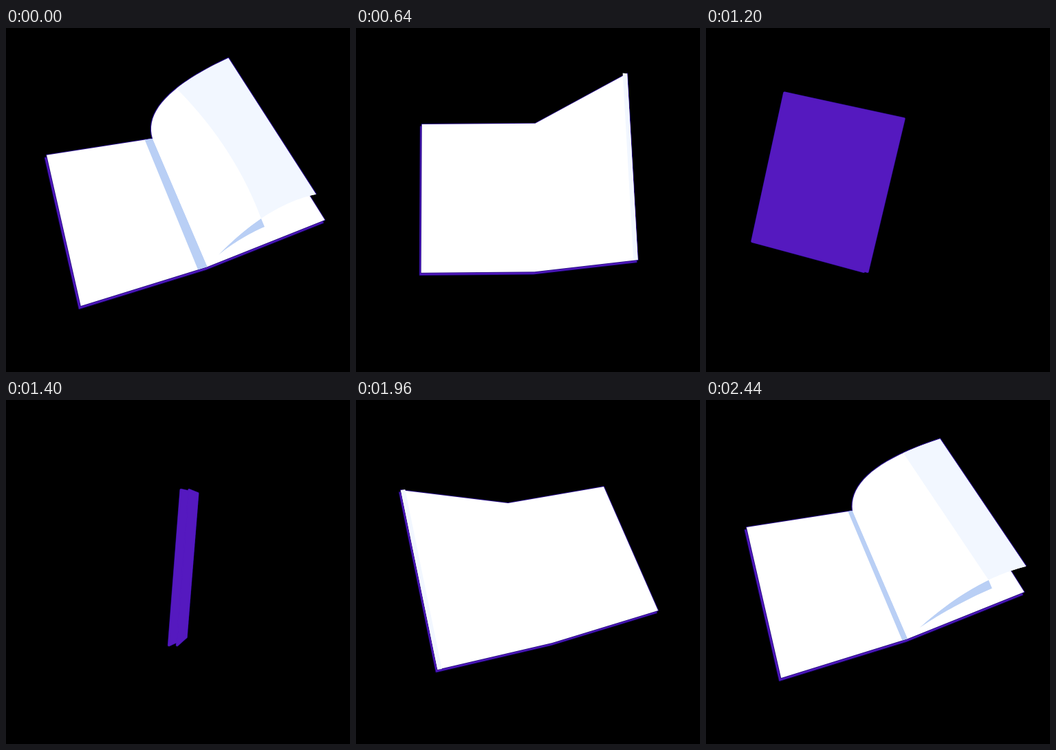
An HTML page with a canvas for the animation above (2480 ms loop, 500 by 500 pixels).

```html
<!DOCTYPE html>
<html lang="en">
<head>
<meta charset="utf-8">
<title>Turning book</title>
<style>
html, body { margin: 0; width: 100%; height: 100%; overflow: hidden; background: #000; }
canvas { display: block; width: 500px; height: 500px; }
</style>
</head>
<body>
<canvas id="stage" width="500" height="500"></canvas>
<script>
const ctx = document.getElementById('stage').getContext('2d');
const { PI, sin, cos, abs, min, max } = Math;
const LOOP = 2480, STEP = 40;
const PURPLE = '#5519bf', EDGE = '#240b86', WHITE = '#fff', PALE = '#f2f7ff', SHADE = '#b9cff5';

// The cycle runs from the closed book (1120) through opening and page turn to closing (3600)
const SPIN = [1120, 1640], OPEN = [1640, 2012], LEAF = [2206, 3046], CLOSE = [3040, 3600];

// Key poses: time, then the spine's top and bottom point
const SPINE = [
  [1200, 285, 132, 232, 354], [1640, 234, 132, 257, 358], [1960, 221, 150, 285, 353],
  [2460, 213, 161, 293, 347], [2840, 224, 146, 276, 352], [3320, 284, 135, 248, 355],
  [3680, 285, 132, 232, 354]
];
// Reach of each flat half, measured from the spine
const LEFT = [
  [2480, -154, 24, -184, 57], [2840, -161, 29, -171, 50],
  [3320, -170, -22, -165, -33], [3600, -193, -45, -186, -45]
];
const RIGHT = [
  [1640, 151, 1, 157, -22], [1960, 139, -24, 154, -47],
  [2460, 146, -47, 170, -68], [2840, 157, -53, 183, -47]
];

const clamp = v => min(1, max(0, v));
const phase = (t, [from, to]) => clamp((t - from) / (to - from));
const ease = k => k * k * (3 - 2 * k);
const mix = (p, q, k) => [p[0] + (q[0] - p[0]) * k, p[1] + (q[1] - p[1]) * k];
const shift = (p, x, y) => [p[0] + x, p[1] + y];
const bend = (a, q, b, k) => mix(mix(a, q, k), mix(q, b, k), k);
const ends = e => [[e[0], e[1]], [e[2], e[3]]];

// Smooth curve through key poses
function sample(rows, t) {
  const last = rows.length - 1;
  t = min(rows[last][0], max(rows[0][0], t));
  let i = 0;
  while (i < last - 1 && t >= rows[i + 1][0]) i++;
  const a = rows[i], b = rows[i + 1], span = b[0] - a[0], k = (t - a[0]) / span;
  const slope = (n, c) => {
    const p = rows[max(0, n - 1)], q = rows[min(last, n + 1)];
    return (q[c] - p[c]) / (q[0] - p[0]) * span;
  };
  return [1, 2, 3, 4].map(c => {
    const m = slope(i, c), n = slope(i + 1, c), d = b[c] - a[c];
    return a[c] + k * (m + k * (3 * d - 2 * m - n + k * (m + n - 2 * d)));
  });
}

// Outer edge of a sheet turned about the spine: 0 lies right, PI lies left
function turn(spine, t, angle, lift = [0, 0, 0, 0]) {
  const c = cos(angle), s = sin(angle);
  const flat = c > 0 ? sample(RIGHT, t) : sample(LEFT, t <= SPIN[1] ? t + LOOP : t);
  return spine.map((v, i) => v + flat[i] * abs(c) + lift[i] * s);
}

function poly(pts, fill, line, width = 2) {
  ctx.beginPath();
  pts.forEach(p => ctx.lineTo(p[0], p[1]));
  ctx.closePath();
  if (line) {
    ctx.strokeStyle = line;
    ctx.lineWidth = width;
    ctx.stroke();
  }
  ctx.fillStyle = fill;
  ctx.fill();
}

// White pages on a cover that shows as a rim
function pages(pts, rim) {
  poly(pts.map(p => shift(p, -.6 * rim, rim)), PURPLE, EDGE);
  poly(pts, WHITE, EDGE);
}

function closedBook(spine, t) {
  const p = phase(t, SPIN), angle = PI * (1 - p), w = 6 * sin(angle);
  const [a, b] = ends(spine), [e0, e1] = ends(turn(spine, t, angle, [0, 5, 0, -9]));
  const shape = [e0, shift(a, -w, 0), shift(a, w, 0), e1, shift(b, w, 0), shift(b, -w, 0)];
  for (const pts of [[e0, shape[1], shape[5], e1], [e0, shape[2], shape[4], e1]]) poly(pts, PURPLE, EDGE, 4);
  for (const pts of [[e0, shape[1], shape[5], e1], [e0, shape[2], shape[4], e1]]) poly(pts, PURPLE, PURPLE, 3);
}

function castShadow([a, b], [e0, e1], w) {
  const at = (u, v) => mix(mix(a, e0, u), mix(b, e1, u), v);
  poly([a, at(w * .15, 0), at(w, .37), at(w, 1), b], SHADE);
}

// One half of the book swings over the other
function swing(spine, t, closing) {
  const shut = closing ? phase(t, CLOSE) : 1 - phase(t, OPEN);
  const angle = PI * (closing ? shut : 1 - shut);
  const lift = closing ? [-18, -57, -34, 58] : [-39, -96, 0, -30];
  const ab = ends(spine), [a, b] = ab;
  const flat = ends(turn(spine, t, closing ? PI : 0));
  const cover = ends(turn(spine, t, angle, lift)), [c0, c1] = cover;
  const thick = (closing ? -15 : 15) * sin(angle);
  const [i0, i1] = cover.map(p => shift(p, thick, -2 * sin(angle)));
  const rim = 4.5 * (1 - shut) ** 2, w = clamp(1.4 * shut - .35);
  const cross = (c0[0] - a[0]) * (b[1] - a[1]) - (c0[1] - a[1]) * (b[0] - a[0]);
  if ((cross > 0) === closing) {
    pages([a, c0, c1, b, flat[1], flat[0]], rim);
    poly([c0, i0, i1, c1], PALE);
    if (w > 0) castShadow(ab, flat, w);
  } else {
    pages([a, ...flat, b], rim);
    if (w > 0) castShadow(ab, flat, w);
    poly([a, i0, i1, b], WHITE, EDGE, 1);
    poly([c0, i0, i1, c1], PALE, EDGE);
    poly([a, c0, c1, b], PURPLE, PURPLE, 3);
  }
}

// A curled page; p runs from 0 (right) to 1 (left)
function leaf(spine, t, p) {
  const angle = PI * p, s = sin(angle), [a, b] = ends(spine);
  const lift = k => [20 - 43 * k, -118, 70 * (1 - k), -108 * (1 - k)];
  const [e0, e1] = ends(turn(spine, t, angle, lift(p)));
  const curl = .45 * (PI - angle) * clamp(p * 8);
  const q0 = mix(a, ends(turn(spine, t, angle + curl, lift(p)))[0], .54);
  const q1 = shift(mix(b, e1, .5), 0, -68 * s * (1 - p));
  const top = k => bend(a, q0, e0, k), low = k => bend(b, q1, e1, k);
  const run = (f, from, to) => Array.from({ length: 21 }, (_, i) => f(from + (to - from) * i / 20));
  const crease = clamp(1.25 - 2.5 * p), foot = crease ** 1.5;

  const size = clamp(p * 8) * clamp(crease * 3);
  if (size > 0) {
    const tip = low(.1), end = shift(low(foot), 5 * size, 12 * size);
    const belly = shift(mix(end, tip, .5), -4, -4);
    poly([...run(low, .1, foot), ...run(k => bend(end, belly, tip, k), 0, 1)], SHADE);
  }

  const sheet = [...run(top, 0, 1), ...run(low, 1, 0)];
  ctx.beginPath();
  sheet.slice(0, 22).forEach(pt => ctx.lineTo(pt[0], pt[1]));
  ctx.strokeStyle = EDGE;
  ctx.lineWidth = 2.5;
  ctx.stroke();
  poly(sheet, WHITE);

  const bow = 22 * clamp(p * 20 - 4) * clamp(crease * 4);
  const mid = shift(mix(low(foot), top(crease), .5), bow, -bow / 2);
  ctx.globalAlpha = clamp((1 - p) * 8);
  poly([...run(top, crease, 1), ...run(low, 1, foot), ...run(k => bend(low(foot), mid, top(crease), k), 0, 1)], PALE);
  ctx.globalAlpha = 1;
}

function openBook(spine, t) {
  const [a, b] = ends(spine), p = ease(phase(t, LEAF));
  const [l0, l1] = ends(turn(spine, t, PI)), [r0, r1] = ends(turn(spine, t, 0));
  pages([a, l0, l1, b, r1, r0], 4);
  if (p === 0 || p === 1) return;
  const w = clamp(1.19 * p * p);
  poly([a, mix(a, l0, w), mix(b, l1, w), b], SHADE);
  leaf(spine, t, p);
}

function draw(t) {
  ctx.fillStyle = '#000';
  ctx.fillRect(0, 0, 500, 500);
  ctx.lineJoin = 'round';
  const spine = sample(SPINE, t);
  if (t <= SPIN[1]) closedBook(spine, t);
  else if (t < OPEN[1]) swing(spine, t, false);
  else if (t < CLOSE[0]) openBook(spine, t);
  else swing(spine, t, true);
}

const origin = performance.now();
function tick() {
  const t = Math.floor(((performance.now() - origin) % LOOP) / STEP) * STEP;
  draw(t < SPIN[0] ? t + LOOP : t);
  requestAnimationFrame(tick);
}
tick();
</script>
</body>
</html>
```
